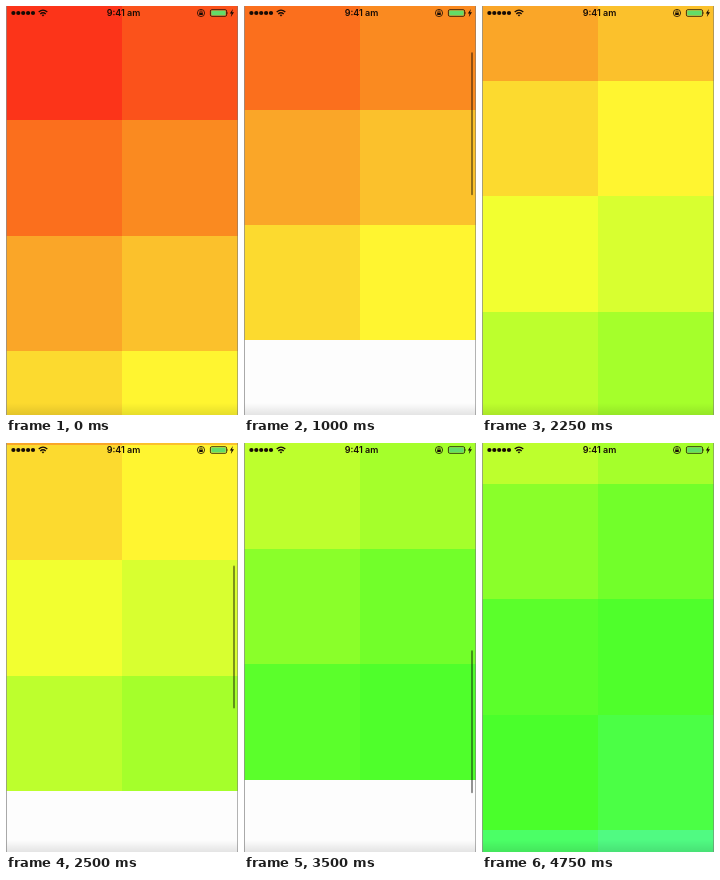
Write an HTML page that moves like this. It is 232 by 409 pixels and loops after 5 s.

```html
<!DOCTYPE html>
<html lang="en">
<head>
<meta charset="utf-8">
<title>Color grid</title>
<style>
html, body { margin: 0; width: 100%; height: 100%; overflow: hidden; background: #fdfdfd; }
svg { display: block; width: 232px; height: 409px; }
text { font: 600 9px Inter, "Liberation Sans", sans-serif; }
</style>
</head>
<body>
<svg viewBox="0 0 232 409">
  <defs>
    <linearGradient id="shade" x2="0" y2="1">
      <stop offset="0" stop-opacity="0"/>
      <stop offset="1" stop-opacity=".1"/>
    </linearGradient>
  </defs>
  <rect width="232" height="409" fill="#fdfdfd"/>
  <g id="grid" shape-rendering="crispEdges"></g>
  <rect id="bar" x="227" width="2" height="143" rx="1" fill-opacity=".42"/>
  <rect y="397" width="232" height="12" fill="url(#shade)"/>
  <path d="M.5 0V409" stroke="#8c8c8c" stroke-opacity=".75"/>
  <path d="M231.5 0V409" stroke="#777" stroke-opacity=".55"/>
  <g fill="#160b05">
    <g id="dots"></g>
    <g fill="none" stroke="#160b05" stroke-width="1.3">
      <path d="M32.7 6.1Q37 2.1 41.3 6.1M34.3 8Q37 5.5 39.7 8"/>
      <circle cx="195" cy="7" r="3.6" stroke-width=".8"/>
      <path d="M193.9 7V5.9a1.1 1.1 0 0 1 2.2 0V7" stroke-width=".7"/>
      <rect x="204.4" y="3.7" width="16.2" height="6.6" rx="1.4" stroke-width=".8"/>
    </g>
    <path d="M35.6 9.1Q37 7.9 38.4 9.1L37 10.6Z"/>
    <rect x="193.2" y="6.7" width="3.6" height="2.4" rx=".4"/>
    <rect x="205.3" y="4.6" width="14.4" height="4.8" rx=".6" fill="#63dc68"/>
    <path d="M221.2 5.7q1.2 1.3 0 2.6ZM226.9 3 223.8 7.5H225.6L224.8 11 228 6.3H226.1Z"/>
    <text x="117.5" y="10.2" text-anchor="middle">9:41 am</text>
  </g>
</svg>
<script>
const NS = "http://www.w3.org/2000/svg";
const STEP = 250, LOOP = 5000, ROW = 115.35;
const colors = `fc3419 fb521b fb6f1d fa8a20 faa628 fbc12c fcda2f fff530 f2ff30 d8ff30
  bdff2d a5ff2b 8aff2a 72ff2a 5bff2b 4fff2b 4aff2b 4bff45 4bff66 50fa82`.split(/\s+/);

// Drag position for each quarter second of the loop
const scroll = [0, 0, 0, 30, 126, 130, 165, 270, 270, 270,
  343, 410, 414, 455, 585, 590, 588, 588, 650, 650];
const idle = new Set([0, 1, 2, 8, 9, 12, 19]);

const make = (parent, tag, attrs) => {
  const el = document.createElementNS(NS, tag);
  for (const key in attrs) el.setAttribute(key, attrs[key]);
  return document.getElementById(parent).appendChild(el);
};

for (let i = 0; i < 5; i++) make("dots", "circle", { cx: 7.4 + i * 4.9, cy: 7, r: 2.1 });

const cells = colors.map((c, i) => make("grid", "rect", {
  x: i % 2 ? 116 : 0, width: 116, fill: "#" + c
}));
const bar = document.getElementById("bar");

// New rows appear only once scrolling comes to rest
const loadedRows = step => step < 8 ? 4 : step < 12 ? 6 : step < 19 ? 8 : 10;

function draw(time) {
  const step = Math.floor(time % LOOP / STEP);
  const offset = scroll[step], rows = loadedRows(step);
  const edge = row => Math.round(row * ROW - 1 - offset);
  cells.forEach((cell, i) => {
    const row = i >> 1;
    cell.setAttribute("y", edge(row));
    cell.setAttribute("height", edge(row + 1) - edge(row));
    cell.setAttribute("visibility", row < rows ? "visible" : "hidden");
  });
  bar.setAttribute("y", 2 + offset * 0.351);
  bar.setAttribute("visibility", idle.has(step) ? "hidden" : "visible");
}

const start = performance.now();
function tick() {
  draw(performance.now() - start);
  requestAnimationFrame(tick);
}
tick();
</script>
</body>
</html>
```
